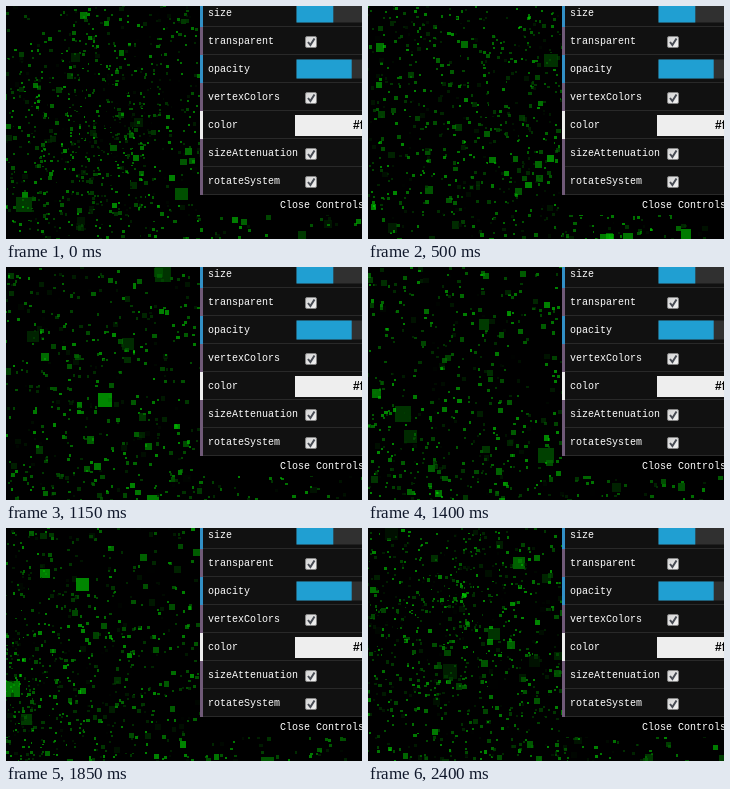
An HTML page with a canvas that plays this animation: 356 px wide and 233 px high, repeating every 2450 ms.

```html
<!DOCTYPE html>
<html lang="en">
<head>
<meta charset="utf-8">
<title>Particle cloud</title>
<style>
  html, body { margin: 0; width: 100%; height: 100%; overflow: hidden; background: #000; }
  canvas, svg { position: absolute; left: 0; top: 0; width: 356px; height: 233px; display: block; }
  text { fill: #fff; font: 10px "Liberation Mono", "DejaVu Sans Mono", monospace; white-space: pre; }
  .hex { fill: #000; font: bold 12px "Liberation Sans", Arial, sans-serif; }
</style>
</head>
<body>
<canvas id="view" width="356" height="233"></canvas>
<svg id="panel" viewBox="0 0 356 233">
  <defs>
    <linearGradient id="face" x2="1" y2="1">
      <stop stop-color="#d2d2d2"/><stop offset="1" stop-color="#f4f4f4"/>
    </linearGradient>
  </defs>
</svg>
<script>
const W = 356, H = 233, LOOP = 2450, TICK = 50;

// Control panel
const BLUE = '#209fd2', ROW = 28;
const rows = [
  ['size', 'slider', 0.4], ['transparent', 'check'], ['opacity', 'slider', 0.6],
  ['vertexColors', 'check'], ['color', 'color'],
  ['sizeAttenuation', 'check'], ['rotateSystem', 'check']
];
const edge = { slider: '#3290c6', check: '#705a78', color: '#eee' };
const rect = (x, y, w, h, fill) => `<rect x="${x}" y="${y}" width="${w}" height="${h}" fill="${fill}"/>`;
const label = (x, y, s, cls = '') => `<text x="${x}" y="${y}" class="${cls}">${s}</text>`;
const widgets = {
  slider: (y, part) => rect(290.5, y + 4.5, 92, 19, '#303030') + rect(290.5, y + 4.5, part * 92, 19, BLUE),
  check: y => `<rect x="299.5" y="${y + 9.5}" width="11" height="11" rx="1.5" fill="url(#face)" stroke="#858585"/>
    <path d="M302 ${y + 15}l2.4 3 4.1-6.5" fill="none" stroke="#484c54" stroke-width="2"/>`,
  color: y => rect(289, y + 4, 70, 21, '#eee') + label(347, y + 18, '#ffffff', 'hex')
};

let markup = rect(194, 0, 162, 209, '#000');
rows.forEach(([name, kind, value], i) => {
  const y = i * ROW - 7;
  markup += rect(194, y, 162, 27, '#111') + rect(194, y + 27, 162, 1, '#292929') +
    rect(194, y, 3, ROW, edge[kind]) + label(202, y + 17, name) + widgets[kind](y, value);
});
panel.innerHTML += markup + label(274, 202, 'Close Controls');

// Particle cloud: a cube of points turning about x and z, with the camera inside it
const COUNT = 15000, RANGE = 500, CAM_Z = 150, NEAR = 45;
const FOCAL = 483, SIZE = 800, OPACITY = 0.6;
const CX = 0, CY = 193, START = 1.15, TURN = 0.03;

let seed = 4711;
const random = () => {
  seed = (seed + 0x6D2B79F5) | 0;
  let n = Math.imul(seed ^ seed >>> 15, 1 | seed);
  n = n + Math.imul(n ^ n >>> 7, 61 | n) ^ n;
  return ((n ^ n >>> 14) >>> 0) / 4294967296;
};
const coord = () => (random() - 0.5) * RANGE;

const points = Array.from({ length: COUNT }, () => ({
  x: coord(), y: coord(), z: coord(),
  fill: `rgba(0,${Math.round(random() * 230)},0,${OPACITY})`
}));

const ctx = view.getContext('2d');

function draw(step) {
  const angle = START + step * TURN, c = Math.cos(angle), s = Math.sin(angle);
  ctx.fillStyle = '#000';
  ctx.fillRect(0, 0, W, H);
  for (const p of points) {
    const x = p.x * c - p.y * s, v = p.x * s + p.y * c;
    const y = v * c - p.z * s, depth = CAM_Z - v * s - p.z * c;
    if (depth < NEAR) continue;
    const size = SIZE / depth;
    const sx = CX + x * FOCAL / depth - size / 2, sy = CY - y * FOCAL / depth - size / 2;
    if (sx < -size || sx > W || sy < -size || sy > H) continue;
    const left = Math.round(sx), top = Math.round(sy);
    ctx.fillStyle = p.fill;
    ctx.fillRect(left, top, Math.round(sx + size) - left, Math.round(sy + size) - top);
  }
}

let origin = null, shown = 0;
function frame(now) {
  if (origin === null) origin = now;
  const step = Math.floor((now - origin) % LOOP / TICK);
  if (step !== shown) draw(shown = step);
  requestAnimationFrame(frame);
}
draw(0);
requestAnimationFrame(frame);
</script>
</body>
</html>
```
